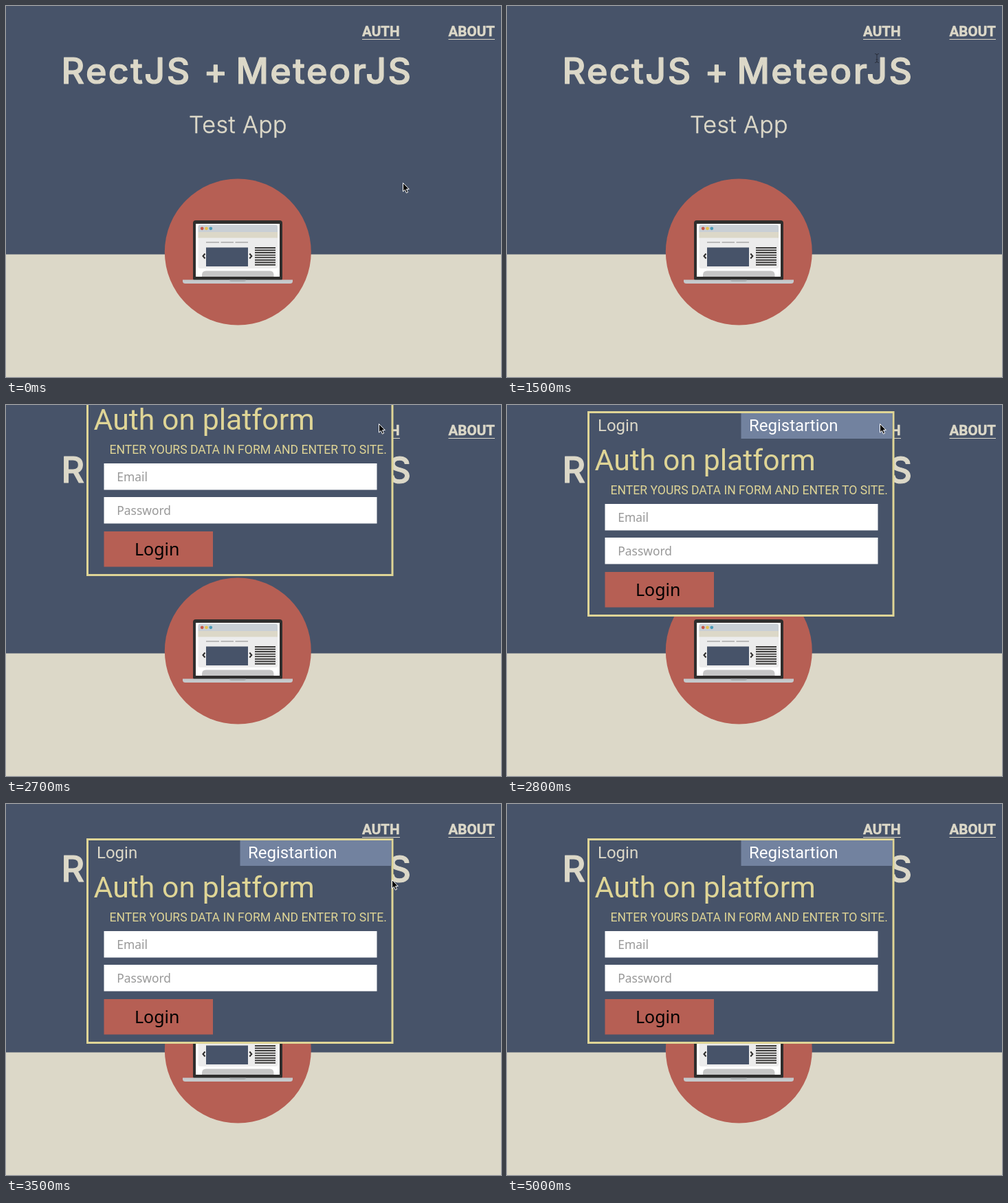
An HTML page for the animation above (5.1 s loop, 720 px wide and 540 px high).

```html
<!DOCTYPE html>
<html lang="en">
<head>
<meta charset="utf-8">
<title>Test App</title>
<style>
  html, body { margin: 0; width: 100%; height: 100%; overflow: hidden; background: #dcd8c8; }
  svg { display: block; width: 720px; height: 540px; font-family: Roboto, sans-serif; }
  .navy { fill: #475369; }
  .red { fill: #b65f54; }
  .sand { fill: #dcd8c8; }
  .gold { fill: #dfd596; }
  .white { fill: #fff; }
  .title, .sub, .nav { stroke: #dcd8c8; stroke-linejoin: round; }
  .title { font: 500 52px Inter, sans-serif; letter-spacing: 2.4px; stroke-width: 1.2px; }
  .sub { font: 300 34px Inter, sans-serif; letter-spacing: .4px; stroke-width: .5px; text-anchor: middle; }
  .nav { font-weight: 700; font-size: 20.6px; stroke-width: .5px; }
  .tab { font-size: 24px; }
  .head { font-size: 42.8px; }
  .note { font-size: 17.6px; }
  .field { font: 500 17.4px "Noto Sans", sans-serif; fill: #999; }
  .submit { font: 25px "Noto Sans", sans-serif; }
  .cursor > * { display: none; }
  .cursor.arrow .arrow, .cursor.beam .beam, .cursor.hand .hand { display: inline; }
</style>
</head>
<body>
<svg viewBox="0 0 720 540">
  <rect class="sand" width="720" height="540"/>
  <rect class="navy" width="720" height="361.5"/>

  <g class="sand">
    <text class="nav" x="518" y="43.5">AUTH</text>
    <rect x="518" y="48" width="55" height="1"/>
    <text class="nav" x="643.5" y="43.5">ABOUT</text>
    <rect x="643.5" y="48" width="67.5" height="1"/>
    <text class="title" y="113"><tspan x="80.5">RectJS</tspan> <tspan x="287.5">+</tspan> <tspan x="334.5">MeteorJS</tspan></text>
    <text class="sub" x="337.5" y="185">Test App</text>
  </g>

  <circle class="red" cx="337.3" cy="358" r="106.5"/>

  <g id="laptop">
    <rect x="272" y="312" width="130" height="88" rx="4" fill="#2f2e2d"/>
    <rect class="white" x="276" y="317" width="122" height="77"/>
    <rect x="279.5" y="318.5" width="115.5" height="63.5" rx="3" fill="#ececec"/>
    <path d="M279.5 329v-7.5q0-3 3-3h109.500q3 0 3 3v7.5z" fill="#c9cfd5"/>
    <rect class="sand" x="279.5" y="329" width="115.5" height="8.5"/>
    <circle cx="285.2" cy="323.8" r="2.4" fill="#c4564b"/>
    <circle cx="291.5" cy="323.8" r="2.4" fill="#e6c14d"/>
    <circle cx="297.8" cy="323.8" r="2.4" fill="#4a9bb8"/>
    <path d="M291 344h19m2.500 0h18.500m2.500 0h18.500" stroke="#b9b9b9" stroke-width="2"/>
    <rect class="navy" x="291" y="351.5" width="61" height="27.5"/>
    <path d="M289.500 360.500l-3 3.500 3 3.500M354.300 360.500l3 3.500-3 3.500" fill="none" stroke="#2f2e2d" stroke-width="2"/>
    <path d="M377 351v27" stroke="#3b3a39" stroke-width="30" stroke-dasharray="1.9 1.65"/>
    <path d="M285 394v-2.500q0-6 6-6h92.500q6 0 6 6v2.500z" fill="#c6c6c6"/>
    <path d="M257 398.500h160v2q0 3.500-4 3.500h-152q-4 0-4-3.500z" fill="#c5c9cc"/>
    <path d="M325 398.500h24q0 2.500-3 2.500h-18q-3 0-3-2.500z" fill="#a9adb0"/>
  </g>

  <g id="popup">
    <rect class="navy" x="118.5" y="51.5" width="443.5" height="296" stroke="#dfd596" stroke-width="3"/>
    <rect x="340.5" y="53" width="220" height="37" fill="#72829f"/>
    <text class="tab sand" x="132" y="79">Login</text>
    <text class="tab white" x="352" y="79">Registartion</text>
    <text class="head gold" x="127.5" y="136">Auth on platform</text>
    <text class="note gold" x="150.5" y="170.5">ENTER YOURS DATA IN FORM AND ENTER TO SITE.</text>
    <rect class="white" x="142.5" y="185" width="397" height="38.5"/>
    <rect class="white" x="142.5" y="234" width="397" height="38.5"/>
    <text class="field" x="161.3" y="210.5">Email</text>
    <text class="field" x="161.3" y="260">Password</text>
    <rect class="red" x="142.5" y="284" width="158.5" height="51.5"/>
    <text class="submit" x="187" y="319">Login</text>
  </g>

  <g id="cursor">
    <path class="arrow" d="M.5.5v12.500l2.800-2.600 2.100 4.700 2.200-1-2.100-4.500h3.800z" stroke="#fff"/>
    <path class="beam" d="M-3-6.500q3 0 3 2 0-2 3-2M0-4.500v9M-3 6.500q3 0 3-2 0 2 3 2M-1.500 2h3" fill="none" stroke="#20252e" stroke-opacity=".75"/>
    <path class="hand" d="M-1 1q1-2 2 0l1.200 3V1.500q1.200-1 2 0 1-.8 1.800.5 1.200-.3 1.500 1V8l-1.500 4H.5L-3 7.500q0-1.500 1.500-1L.5 7.500z" fill="#fff" stroke="#111" stroke-width=".9"/>
  </g>
</svg>
<script>
  const LOOP = 5100, STEP = 100;
  const DROP = { start: 2500, time: 600, from: 350 };

  // time, x, y, pointer shape from that time on
  const path = [
    [0, 577, 257, 'arrow'],
    [600, 577, 257, 'arrow'],
    [1300, 540, 92, 'beam'],
    [1500, 538, 76, 'beam'],
    [1800, 540, 58, 'arrow'],
    [2200, 542, 26, 'arrow'],
    [2900, 542, 27, 'hand'],
    [3000, 543, 29, 'hand'],
    [3300, 545, 36, 'arrow'],
    [4000, 626, 409, 'arrow'],
    [4300, 626, 409, 'arrow'],
    [4600, 642, 496, 'arrow'],
    [4700, 646, 545, 'none']
  ];

  const popup = document.getElementById('popup');
  const cursor = document.getElementById('cursor');
  const smooth = p => p * p * (3 - 2 * p);
  const place = (el, x, y) => el.setAttribute('transform', `translate(${x} ${y})`);

  function movePopup(t) {
    const p = Math.min((t - DROP.start) / DROP.time, 1);
    popup.style.display = p > 0 ? '' : 'none';
    place(popup, 0, p > 0 ? -Math.round(DROP.from * (1 - p) ** 3.1) : 0);
  }

  function moveCursor(t) {
    const i = path.findLastIndex(k => k[0] <= t);
    const [t0, x0, y0, shape] = path[i];
    const [t1, x1, y1] = path[i + 1] || [LOOP, x0, y0];
    const p = smooth((t - t0) / (t1 - t0));
    cursor.setAttribute('class', 'cursor ' + shape);
    place(cursor, Math.round(x0 + (x1 - x0) * p), Math.round(y0 + (y1 - y0) * p));
  }

  const begin = performance.now();
  function draw() {
    const t = Math.floor((performance.now() - begin) % LOOP / STEP) * STEP;
    movePopup(t);
    moveCursor(t);
    requestAnimationFrame(draw);
  }
  draw();
</script>
</body>
</html>
```
